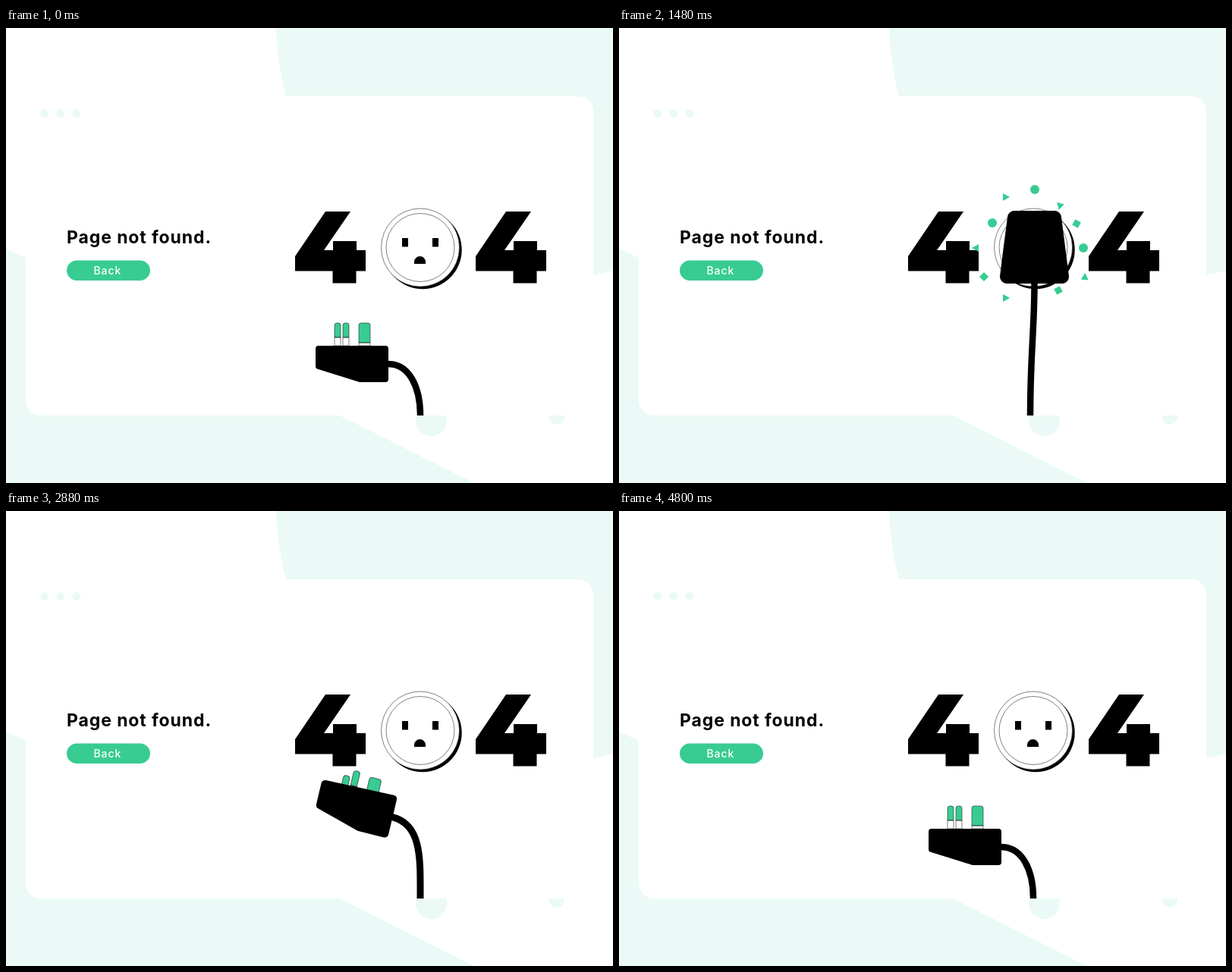
Write an HTML page that moves like this. It is 800 by 600 pixels and loops after 4840 ms.

```html
<!DOCTYPE html>
<html lang="en">
<head>
<meta charset="utf-8">
<title>Page not found</title>
<style>
  html, body { margin: 0; width: 100%; height: 100%; overflow: hidden; background: #fff; }
  svg { display: block; width: 100vw; height: 100vh; }
  text { font-family: Inter, sans-serif; }
  .tint { fill: #ebfaf6; }
  .green { fill: #38cc92; }
  .thin { fill: #fff; stroke: #000; stroke-width: .5; }
</style>
</head>
<body>
<svg viewBox="0 0 800 600">
  <defs>
    <clipPath id="aboveFold"><rect width="800" height="511"/></clipPath>
    <path id="four" d="M421 242H454L419 293H431V281H462V293H474V320.500H461.500V336.500H430.500V320.500H381V301Z"/>
  </defs>

  <path class="tint" d="M356 0Q357 45 369 90L774 326L800 320V0Z"/>
  <path class="tint" d="M0 291L26 303L440 511L617 600H0Z"/>
  <circle class="tint" cx="560.5" cy="517.5" r="20.5"/>
  <circle class="tint" cx="726" cy="513" r="10"/>
  <rect x="26" y="90" width="748" height="421" rx="20" fill="#fff"/>
  <g class="tint">
    <circle cx="51" cy="112.5" r="5.5"/><circle cx="72" cy="112.5" r="5.5"/><circle cx="93" cy="112.5" r="5.5"/>
  </g>

  <text x="80" y="284" font-size="23" font-weight="700" letter-spacing=".9">Page not found.</text>
  <rect class="green" x="80" y="306.500" width="110" height="26.500" rx="13.250"/>
  <text x="115.500" y="325" font-size="14" font-weight="500" letter-spacing=".9" fill="#fff">Back</text>

  <use href="#four"/>
  <use href="#four" x="238"/>

  <circle cx="549" cy="292.500" r="51.700"/>
  <circle class="thin" cx="546" cy="289.500" r="51.500"/>
  <circle class="thin" cx="546" cy="289.500" r="45"/>
  <path d="M522 277h8v11.500h-8zM562 277h8v11.500h-8zM538 311v-2.500a7.500 7.500 0 0 1 15 0v2.500z"/>

  <g id="confetti" class="green"></g>
  <g id="sparks" fill="none" stroke="#38cc92" stroke-width="2.500"></g>
  <g clip-path="url(#aboveFold)">
    <path id="cord" fill="none" stroke="#000"/>
    <g id="plug">
      <g id="pins"></g>
      <path id="body" stroke="#000" stroke-linejoin="round"/>
    </g>
  </g>
</svg>
<script>
const LOOP = 4840, STEP = 40;
const $ = id => document.getElementById(id);
const lerp = (a, b, p) => a + (b - a) * p;
const clamp = p => Math.max(0, Math.min(1, p));

const easeIn = p => p ** 3;
const easeOut = p => 1 - (1 - p) ** 2;
const easeInOut = p => p < .5 ? 2 * p * p : 1 - 2 * (1 - p) ** 2;

// time, easing into the key, then: x, y, angle, turn (0 side view, 1 back view), scale
const plugKeys = [
  [0, easeInOut, 456, 443, 0, 0, 1],
  [840, easeInOut, 518, 292.5, 65, 1, 1.11],
  [1100, easeInOut, 547.5, 289, 90, 1, 1],
  [2680, easeInOut, 547.5, 289, 90, 1, 1],
  [2880, easeIn, 460, 392, 13.3, .14, 1.06],
  [3120, easeOut, 457, 450, -20, 0, 1],
  [3720, easeInOut, 456, 442, 2, 0, 1],
  [4020, easeInOut, 456, 443, 0, 0, 1],
  [LOOP, easeInOut, 456, 443, 0, 0, 1]
];
// time, easing, x of the lower cord end
const cordKeys = [
  [0, 546], [840, 547], [1120, 549], [1480, 542], [1800, 550],
  [2120, 547], [2440, 548.5], [2880, 546], [LOOP, 546]
].map(([time, x]) => [time, easeInOut, x]);

function sample(keys, t) {
  const i = keys.findIndex(key => key[0] > t);
  const from = keys[i - 1], to = keys[i];
  const p = to[1]((t - from[0]) / (to[0] - from[0]));
  return from.slice(2).map((v, j) => lerp(v, to[j + 2], p));
}

// left edge, width, green length, how fast it sinks behind the body
const pins = [[-23, 8, 19, 120], [-12, 8, 19, 60], [9, 15, 26, 85]];
const cap = (x, w, h) => `M${x} ${h - 54}v${3 - h}q0 -3 3 -3h${w - 6}q3 0 3 3v${h - 3}z`;
$('pins').innerHTML = pins.map(([x, w, green]) =>
  `<g><path class="green" d="${cap(x, w, green)}"/>
   <path class="thin" d="M${x} ${green - 54}h${w}V-24h${-w}z"/>
   <path class="thin" style="fill:none" d="${cap(x, w, green)}"/></g>`).join('');

const sideView = [[-44, -20], [44, -20], [44, 20], [10.5, 20], [-44, 3]];
const backView = [[-39, -26.5], [39, -36.5], [39, 36.5], [10.5, 33], [-39, 26.5]];

const shapes = {
  dot: 'M-6 0a6 6 0 1 0 12 0a6 6 0 1 0 -12 0',
  square: 'M-4.300 -4.300h8.600v8.600h-8.600z',
  triangle: 'M5 0L-4 -5V5z'
};
const confetti = [
  ['dot', 2, -75, 0], ['dot', -54, -31, 0], ['dot', 66, 2, 0],
  ['square', 57, -30, 30], ['square', 33, 58, -30], ['square', -65, 40, 45],
  ['triangle', -36, -65, 0], ['triangle', 35, -53, 105], ['triangle', 68, 40, -85],
  ['triangle', -36, 68, 0], ['triangle', -76, 2, 180]
];
$('confetti').innerHTML = confetti.map(([kind]) => `<path d="${shapes[kind]}"/>`).join('');

const sparkAngles = [-45, 0, 45];
$('sparks').innerHTML = '<path d="M1 -91l-3 8l4 8l-5 8l4 6l-1 6"/>'.repeat(3);

function drawCord(x, y, angle, scale, end) {
  const a = angle * Math.PI / 180;
  const along = d => [x + d * Math.cos(a), y + d * Math.sin(a)];
  const root = 47 * scale;
  const [rootX, rootY] = along(root);
  const reach = Math.hypot(end - rootX, 511 - rootY);
  $('cord').setAttribute('d',
    `M${rootX} ${rootY}C${along(root + .36 * reach)} ${end} ${511 - .46 * reach} ${end} 511V514`);
  $('cord').setAttribute('stroke-width', 8.5 * scale);
}

function drawPlug(t) {
  let [x, y, angle, turn, scale] = sample(plugKeys, t);
  if (t > 2320 && t < 2680) x += .8 * Math.sin(t / 20);
  $('plug').setAttribute('transform', `translate(${x} ${y}) rotate(${angle}) scale(${scale})`);

  const points = sideView.map((p, i) => p.map((v, j) => lerp(v, backView[i][j], turn)));
  $('body').setAttribute('d', `M${points.join('L')}Z`);
  $('body').setAttribute('stroke-width', lerp(8, 18, turn));
  pins.forEach(([, , , sink], i) =>
    $('pins').children[i].setAttribute('transform', `translate(0 ${Math.min(45, sink * turn)})`));

  drawCord(x, y, angle, scale, sample(cordKeys, t)[0]);
}

function drawConfetti(t) {
  const spread = easeOut(clamp((t - 1160) / 800)) / .64;
  const size = t < 1160 ? 0 : 1 - clamp((t - 1780) / 300);
  $('confetti').style.display = size ? '' : 'none';
  confetti.forEach(([, dx, dy, angle], i) => $('confetti').children[i].setAttribute('transform',
    `translate(${546 + dx * spread} ${288 + dy * spread}) rotate(${angle}) scale(${size})`));
}

function drawSparks(t) {
  const flight = (t - 2440) * .3;
  $('sparks').style.display = t >= 2320 && t <= 2640 ? '' : 'none';
  $('sparks').style.opacity = 1 - clamp((t - 2560) / 100);
  sparkAngles.forEach((angle, i) => $('sparks').children[i].setAttribute('transform',
    `translate(546 288) rotate(${angle}) translate(0 ${-flight})`));
}

const start = performance.now();
function frame() {
  const elapsed = (performance.now() - start) % LOOP;
  const t = Math.floor(elapsed / STEP) * STEP;
  drawPlug(t);
  drawConfetti(t);
  drawSparks(t);
  requestAnimationFrame(frame);
}
frame();
</script>
</body>
</html>
```
